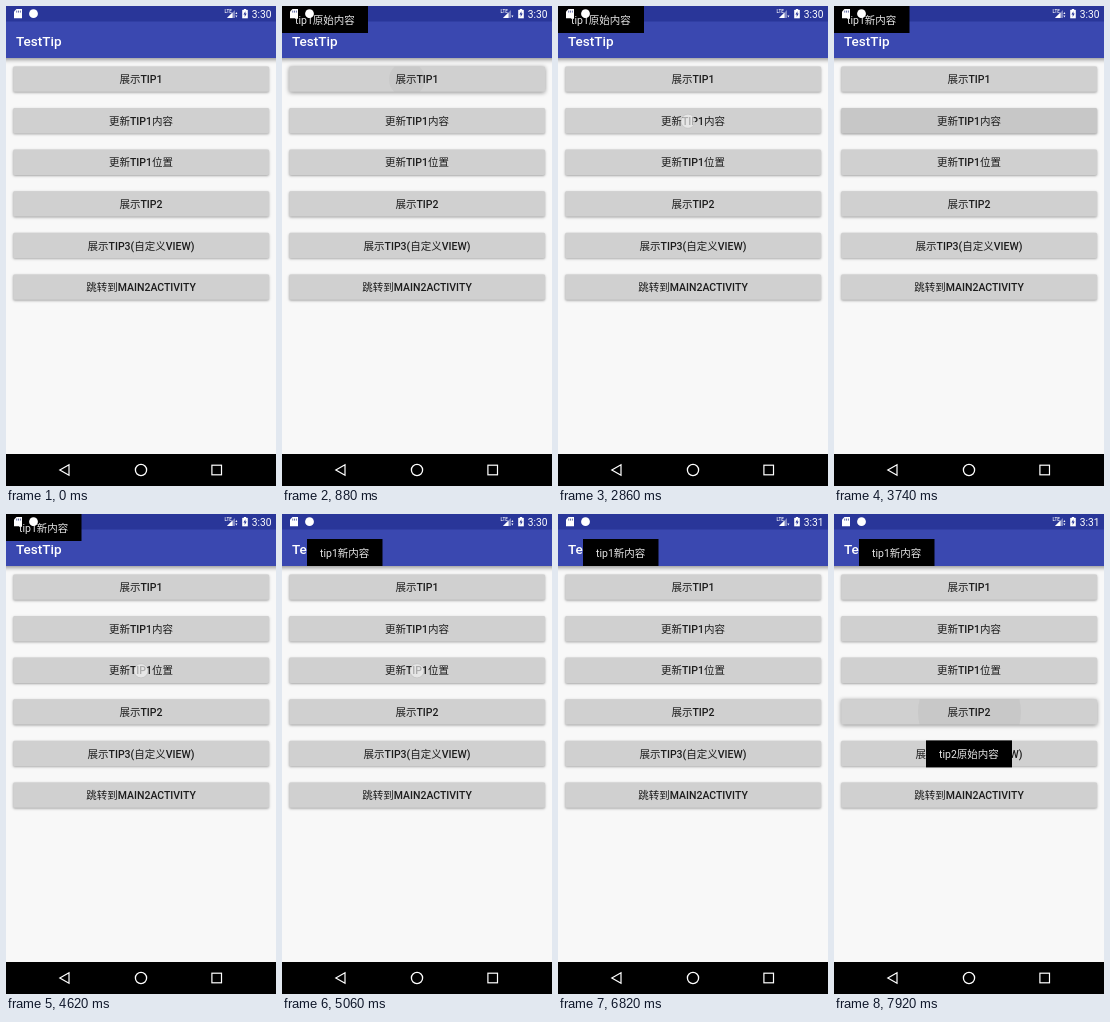
An HTML page with a canvas for the animation above (8000 ms loop, 270 by 480 pixels).

```html
<!DOCTYPE html>
<html lang="zh-CN">
<head>
<meta charset="utf-8">
<title>TestTip</title>
<style>
html, body { margin: 0; width: 100%; height: 100%; overflow: hidden; background: #f8f8f8; }
canvas { display: block; width: 270px; height: 480px; }
</style>
</head>
<body>
<canvas id="stage" width="270" height="480"></canvas>
<script>
const ctx = document.getElementById('stage').getContext('2d');
const LOOP = 8000, STEP = 220;
const LABELS = ['展示TIP1', '更新TIP1内容', '更新TIP1位置', '展示TIP2', '展示TIP3(自定义VIEW)', '跳转到MAIN2ACTIVITY'];
// Each tap: button index, finger x, finger down time, finger up time
const TAPS = [
  { button: 0, x: 125, down: 220, up: 880 },
  { button: 1, x: 130, down: 2860, up: 3300 },
  { button: 2, x: 135, down: 4620, up: 5280 },
  { button: 3, x: 135.5, down: 7040, up: 7700 }
];
// Ripple radius and strength, one entry per step after release
const RIPPLE = [[18, 0.035], [51.5, 0.04], [260, 0.045], [260, 0.022]];
const buttonY = i => 60.4 + 41.6 * i;

function rect(x, y, w, h, color) {
  ctx.fillStyle = color;
  ctx.fillRect(x, y, w, h);
}

function shape(points, color, stroke) {
  ctx.beginPath();
  points.forEach(([x, y]) => ctx.lineTo(x, y));
  ctx.closePath();
  paint(color, stroke);
}

function circle(x, y, r, color, stroke) {
  ctx.beginPath();
  ctx.arc(x, y, r, 0, Math.PI * 2);
  paint(color, stroke);
}

function paint(color, stroke) {
  if (stroke) {
    ctx.lineWidth = stroke;
    ctx.strokeStyle = color;
    ctx.stroke();
  } else {
    ctx.fillStyle = color;
    ctx.fill();
  }
}

function setFont(run, size, weight) {
  ctx.font = /[\u4e00-\u9fff]/.test(run)
    ? `400 ${size}px "Noto Sans CJK SC", "Noto Sans CJK", sans-serif`
    : `${weight} ${size}px Roboto, sans-serif`;
}

function text(str, x, y, color, { size = 10.5, weight = 400, center = false } = {}) {
  const runs = str.match(/[\u4e00-\u9fff]+|[^\u4e00-\u9fff]+/g);
  const widths = runs.map(run => {
    setFont(run, size, weight);
    return ctx.measureText(run).width;
  });
  if (center) x -= widths.reduce((a, b) => a + b, 0) / 2;
  ctx.fillStyle = color;
  runs.forEach((run, i) => {
    setFont(run, size, weight);
    ctx.fillText(run, x, y);
    x += widths[i];
  });
}

function appBar() {
  ctx.save();
  ctx.shadowColor = 'rgba(0,0,0,.38)';
  ctx.shadowBlur = 4;
  ctx.shadowOffsetY = 1.5;
  rect(-5, 0, 280, 52, '#3a48b0');
  ctx.restore();
  rect(0, 0, 270, 15.5, '#293699');
  text('TestTip', 10, 39.5, '#fff', { size: 13.5, weight: 500 });
}

function button(i, t) {
  const y = buttonY(i), tap = TAPS.find(p => p.button === i);
  const stage = tap ? Math.floor((t - tap.up) / STEP) : -1;
  const ripple = stage >= 0 && RIPPLE[stage];
  ctx.save();
  ctx.shadowColor = `rgba(0,0,0,${ripple ? 0.42 : 0.34})`;
  ctx.shadowBlur = ripple && stage < 2 ? 4 : 2.5;
  ctx.shadowOffsetY = 0.9;
  ctx.beginPath();
  ctx.roundRect(7.2, y, 255.8, 25.4, 1.4);
  paint('#d0d0d0');
  ctx.restore();
  if (ripple) {
    ctx.save();
    ctx.clip();
    circle(tap.x, y + 13, ripple[0], `rgba(0,0,0,${ripple[1]})`);
    ctx.restore();
  }
  text(LABELS[i], 135, y + 16.7, '#1c1c1c', { weight: 500, center: true });
}

function finger(t) {
  const tap = TAPS.find(p => t >= p.down && t < p.up);
  if (!tap) return;
  const y = buttonY(tap.button) + 13.2;
  circle(tap.x, y, 7, 'rgba(240,240,240,.68)');
  circle(tap.x, y, 7, 'rgba(150,150,150,.35)', 0.7);
}

function tip(x, y, w, str) {
  rect(x, y, w, 27, '#000');
  text(str, x + 13, y + 17.6, '#e4e4e4');
}

function tips(t) {
  if (t >= 660) {
    const fresh = t >= 3080, moved = t >= 5060;
    tip(moved ? 25 : 0, moved ? 25 : 0, fresh ? 75.5 : 86, fresh ? 'tip1新内容' : 'tip1原始内容');
  }
  if (t >= 7480) tip(92, 226.4, 86, 'tip2原始内容');
}

function statusIcons(t) {
  shape([[10.5, 3], [16, 3], [16, 12.2], [8, 12.2], [8, 5.6]], '#fff');
  [10.3, 12.1, 13.9].forEach(x => rect(x, 4.6, 0.9, 2, '#56609f'));
  circle(27.5, 7.7, 4.4, '#fff');

  text('LTE', 218.5, 7.3, '#fff', { size: 4.6, weight: 500 });
  shape([[229, 4], [229, 12], [221, 12]], 'rgba(255,255,255,.4)');
  shape([[226.5, 6.5], [226.5, 12], [221, 12]], '#fff');
  const phase = Math.floor(t / STEP) % 3;
  if (phase !== 1) shape([[229.4, 8], [231.4, 8], [230.4, 6]], '#fff');
  shape([[229.4, 9.6], [231.4, 9.6], [230.4, 11.6]], '#fff');

  rect(237.8, 3, 2.4, 1.2, '#fff');
  rect(236.2, 3.9, 5.6, 8.4, '#fff');
  shape([[239.4, 5.2], [237.4, 8.6], [238.7, 8.6], [238.7, 11], [240.7, 7.6], [239.4, 7.6]], '#293699');
  text(t >= 6820 ? '3:31' : '3:30', 245.8, 11.7, '#fff', { size: 10.2 });
}

function navBar() {
  rect(0, 448, 270, 32, '#000');
  shape([[53.8, 464], [63, 458.7], [63, 469.3]], '#fff', 1.2);
  circle(135, 464, 5.6, '#fff', 1.3);
  ctx.strokeStyle = '#fff';
  ctx.lineWidth = 1.2;
  ctx.strokeRect(205.9, 459.2, 9.6, 9.6);
}

function draw(now) {
  const t = Math.floor((now % LOOP) / STEP) * STEP;
  rect(0, 0, 270, 480, '#f8f8f8');
  appBar();
  LABELS.forEach((_, i) => button(i, t));
  tips(t);
  statusIcons(t);
  navBar();
  finger(t);
}

let start;
function frame(now) {
  start ??= now;
  draw(now - start);
  requestAnimationFrame(frame);
}
draw(0);
requestAnimationFrame(frame);
</script>
</body>
</html>
```
